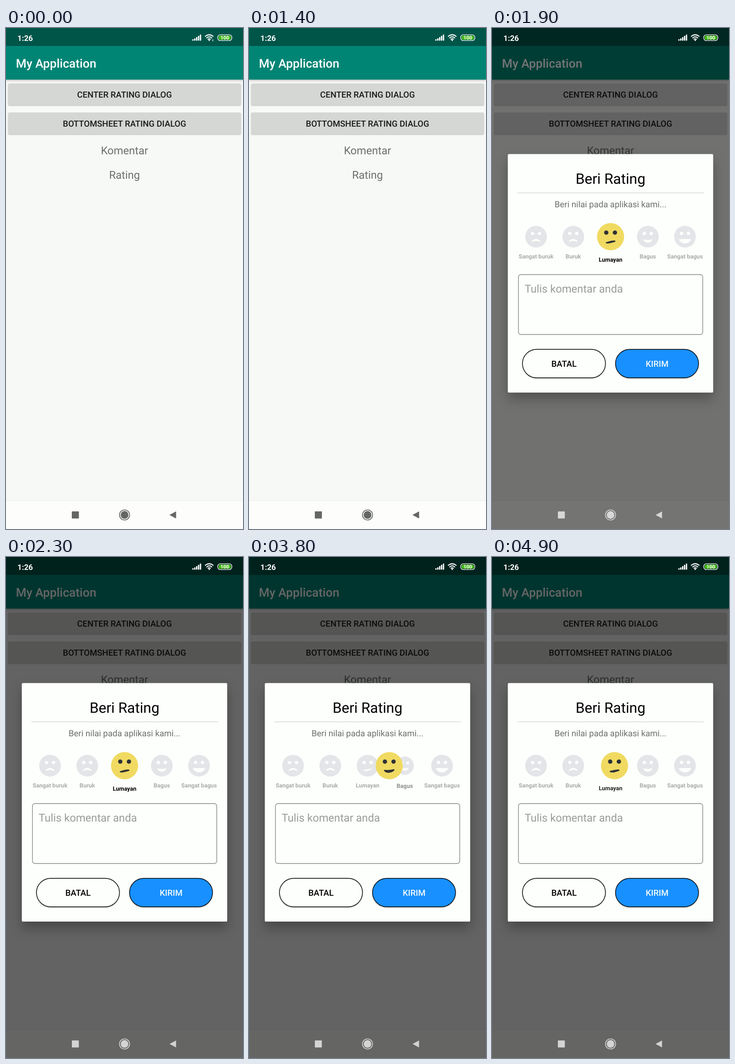
An HTML page that plays this animation: 515x1087 px, repeating every 5000 ms.

```html
<!DOCTYPE html>
<html lang="id">
<head>
<meta charset="utf-8">
<title>Rating dialog</title>
<style>
html, body { margin: 0; width: 100%; height: 100%; overflow: hidden; background: #f7f9f6; }
svg { display: block; width: 100vw; height: 100vh; }
text { font-family: Roboto, Arial, sans-serif; text-rendering: geometricPrecision; }
.mid { text-anchor: middle; }
.btn { font-size: 18.36px; font-weight: 500; text-anchor: middle; }
.body { font-size: 23.6px; fill: #6d6f6d; }
.label { font-size: 12.6px; font-weight: 700; text-anchor: middle; }
.flat { filter: drop-shadow(0 1.5px 1.2px rgba(0,0,0,.26)); }
.bar { filter: drop-shadow(0 2px 2px rgba(0,0,0,.24)); }
.card { filter: drop-shadow(0 14px 13px rgba(0,0,0,.28)); }
</style>
</head>
<body>
<svg viewBox="0 0 515 1087" preserveAspectRatio="none">
  <rect width="515" height="1087" fill="#f7f9f6"/>
  <rect class="bar" y="39" width="515" height="73" fill="#008575"/>
  <rect width="515" height="39" fill="#005549"/>
  <text x="21.5" y="86" font-size="26.2" font-weight="500" fill="#fff">My Application</text>
  <rect id="press" class="flat" x="4.8" y="120.5" width="505.6" height="47" rx="2.6" fill="#d5d7d4"/>
  <rect class="flat" x="4.8" y="183.5" width="505.6" height="47" rx="2.6" fill="#d5d7d4"/>
  <text class="btn" x="257.5" y="151.4" fill="#191b19">CENTER RATING DIALOG</text>
  <text class="btn" x="257.5" y="214.4" fill="#191b19">BOTTOMSHEET RATING DIALOG</text>
  <text class="body mid" x="257.5" y="274.4">Komentar</text>
  <text class="body mid" x="257.5" y="327.4">Rating</text>
  <rect y="1025" width="515" height="62" fill="#fdfefc"/>
  <rect y="1025" width="515" height="1" fill="#ebedea"/>

  <rect id="dim" width="515" height="1087"/>

  <g fill="#fff">
    <text x="24.8" y="27.5" font-size="16.8" font-weight="700">1:26</text>
    <g id="signal"></g>
    <g fill="none" stroke="#fff" stroke-width="2">
      <path d="M432.4 18.6Q441.6 10.6 450.8 18.6M435.4 21.9Q441.6 16.4 447.8 21.9M438.2 24.8Q441.6 22 445 24.8"/>
    </g>
    <circle cx="441.6" cy="26.6" r="1.7"/>
    <path id="traffic" d="M447.6 26.2l1.7-2.2 1.7 2.2zM447.6 27l1.7 2.2 1.7-2.2z" opacity=".8"/>
    <rect x="460.1" y="14.6" width="30.6" height="12.8" rx="5.6" fill="none" stroke="#fff" stroke-width="1.4"/>
    <rect x="462" y="16.4" width="26.8" height="9.2" rx="4" fill="#47bd17"/>
    <text class="mid" x="475.4" y="25" font-size="11" font-weight="700">100</text>
  </g>

  <g id="dialog">
    <rect class="card" x="34.4" y="273.4" width="446.2" height="517.6" rx="2.6" fill="#fdfffc"/>
    <text class="mid" x="257.5" y="338.4" font-size="31.4">Beri Rating</text>
    <rect x="55" y="357" width="405.5" height="1.3" fill="#d2d4d2"/>
    <text class="mid" x="257.5" y="389.2" font-size="18.5" fill="#6d6f6d">Beri nilai pada aplikasi kami...</text>
    <g id="moods"></g>
    <g id="thumb"></g>
    <rect x="57.5" y="535" width="400.4" height="130" rx="5.2" fill="none" stroke="#868886" stroke-width="1.4"/>
    <text class="body" x="71" y="574" style="fill:#9a9c9a">Tulis komentar anda</text>
    <rect class="flat" x="66.2" y="697.2" width="180.4" height="61.8" rx="30.9" fill="#fdfffc" stroke="#000" stroke-width="1.4"/>
    <rect class="flat" x="268.4" y="697.2" width="180.4" height="61.8" rx="30.9" fill="#1890ff" stroke="#000" stroke-width="1.4"/>
    <text class="btn" x="156.4" y="735">BATAL</text>
    <text class="btn" x="358.8" y="735" fill="#f3faff">KIRIM</text>
  </g>

  <g id="nav" stroke-linejoin="round">
    <rect x="143" y="1048.8" width="15.4" height="15.4" rx=".8"/>
    <circle cx="257.6" cy="1056.5" r="8.4"/>
    <circle id="ring" cx="257.6" cy="1056.5" r="11" style="fill:none" stroke-width="1.7"/>
    <path d="M355.2 1056.5L369.6 1048.8V1064.2Z"/>
  </g>
</svg>
<script>
const LOOP = 5000, STEP = 100;
const CENTERS = [95.7, 176.6, 257.7, 338.6, 419.4];
const NAMES = ['Sangat buruk', 'Buruk', 'Lumayan', 'Bagus', 'Sangat bagus'];
const BIG = 29.5, SMALL = 23.6, ROW = 452.8;

// Per mood: half width, height, tilt, bend of upper lip, bend of lower lip, eye sweep
const FACES = [
  [10.5, 13, 0, -7, -4, 270],
  [10.5, 13, 0, -7, -4.5, 305],
  [9, 11.5, 1.6, -1, 1, 360],
  [10.5, 8.5, 0, 2.5, 8.5, 360],
  [15, 8, 0, 0, 12, 360]
];

// Held values, one per step
const DIM = { from: 1800, values: [0, .54, .57, .585, .595, .6] };
const FADE = { from: 1800, values: [.24, 1] };
const DRAG = { from: 3400, values: [234, 182, 151.7, 222, 304.7, 361.3, 388, 406, 416,
  419.4, 419.4, 417, 404, 362, 308, 266.3] };

const $ = id => document.getElementById(id);
const mix = (a, b, f) => a + (b - a) * f;
const mixRgb = (a, b, f) => `rgb(${a.map((v, i) => Math.round(mix(v, b[i], f)))})`;

function held(track, t, before) {
  const i = Math.floor((t - track.from) / STEP);
  return i < 0 ? before : track.values[Math.min(i, track.values.length - 1)];
}

function add(parent, tag, attrs) {
  const el = document.createElementNS('http://www.w3.org/2000/svg', tag);
  for (const k in attrs) el.setAttribute(k, attrs[k]);
  return parent.appendChild(el);
}

function faceAt(mood) {
  const i = Math.min(3, Math.floor(mood));
  return FACES[i].map((v, k) => mix(v, FACES[i + 1][k], mood - i));
}

function mouthPath([w, y, tilt, up, low]) {
  const l = y + tilt, r = y - tilt, c = w * .5;
  return `M${-w} ${l}C${-c} ${l + up} ${c} ${r + up} ${w} ${r}` +
    `C${c} ${r + low} ${-c} ${l + low} ${-w} ${l}Z`;
}

// A disc with its upper inner edge cut off along a chord
function eyePath(side, sweep) {
  const r = 4.7, cx = side * 9.4, cy = -8.9;
  const point = deg => {
    const a = deg * Math.PI / 180;
    return `${cx - side * r * Math.cos(a)} ${cy + r * Math.sin(a)}`;
  };
  const end = Math.min(sweep, 359.9) - 35;
  return `M${point(-35)}A${r} ${r} 0 1 ${side < 0 ? 1 : 0} ${point(end)}Z`;
}

function makeFace(parent, ink) {
  const g = add(parent, 'g', {});
  const disc = add(g, 'circle', { r: BIG });
  const eyes = add(g, 'path', { fill: ink });
  const mouth = add(g, 'path', { fill: ink, stroke: ink, 'stroke-width': 3, 'stroke-linejoin': 'round' });
  return {
    draw(x, scale, mood, color) {
      const f = faceAt(mood);
      g.setAttribute('transform', `translate(${x} ${ROW}) scale(${scale})`);
      disc.setAttribute('fill', color);
      eyes.setAttribute('d', eyePath(-1, f[5]) + eyePath(1, f[5]));
      mouth.setAttribute('d', mouthPath(f));
    }
  };
}

for (let i = 0; i < 5; i++) {
  const h = [2.8, 5, 7.6, 10.4, 13.2][i];
  add($('signal'), 'rect', { x: 404.8 + i * 4.1, y: 27.4 - h, width: 2.9, height: h, rx: .7 });
}

const moods = CENTERS.map((x, i) => {
  const face = makeFace($('moods'), '#fdfffc');
  const label = add($('moods'), 'text', { class: 'label', x });
  label.textContent = NAMES[i];
  return { face, label, x };
});
const thumb = makeFace($('thumb'), '#2f3235');

function drawRating(x) {
  moods.forEach((m, i) => {
    const near = Math.max(0, 1 - Math.abs(x - m.x) / 40.5);
    m.face.draw(m.x, SMALL / BIG * (1 - near), i, '#e3e5e8');
    m.label.setAttribute('y', 500 + 7.2 * near);
    m.label.setAttribute('fill', mixRgb([170, 172, 170], [0, 0, 0], near));
  });
  const mood = Math.max(0, Math.min(4, (x - CENTERS[0]) / 80.93));
  thumb.draw(x, 1, mood, mixRgb([242, 154, 104], [240, 218, 97], Math.min(1, mood)));
}

function draw(t) {
  const open = t >= 1800;
  $('traffic').style.display = t < 500 ? '' : 'none';
  $('press').setAttribute('fill', t >= 1300 && t < 1400 ? '#c5c7c4' : '#d5d7d4');
  $('dim').setAttribute('opacity', held(DIM, t, 0));
  $('dialog').setAttribute('opacity', held(FADE, t, 0));
  const nav = $('nav');
  nav.setAttribute('fill', open ? 'rgba(255,255,255,.72)' : '#646664');
  nav.setAttribute('stroke', open ? 'rgba(0,0,0,.1)' : 'none');
  $('ring').setAttribute('stroke', open ? (t < 1900 ? '#eceeeb' : '#d0d2cf') : '#646664');
  drawRating(held(DRAG, t, CENTERS[2]));
}

const start = performance.now();
function tick() {
  draw((performance.now() - start) % LOOP);
  requestAnimationFrame(tick);
}
tick();
</script>
</body>
</html>
```
